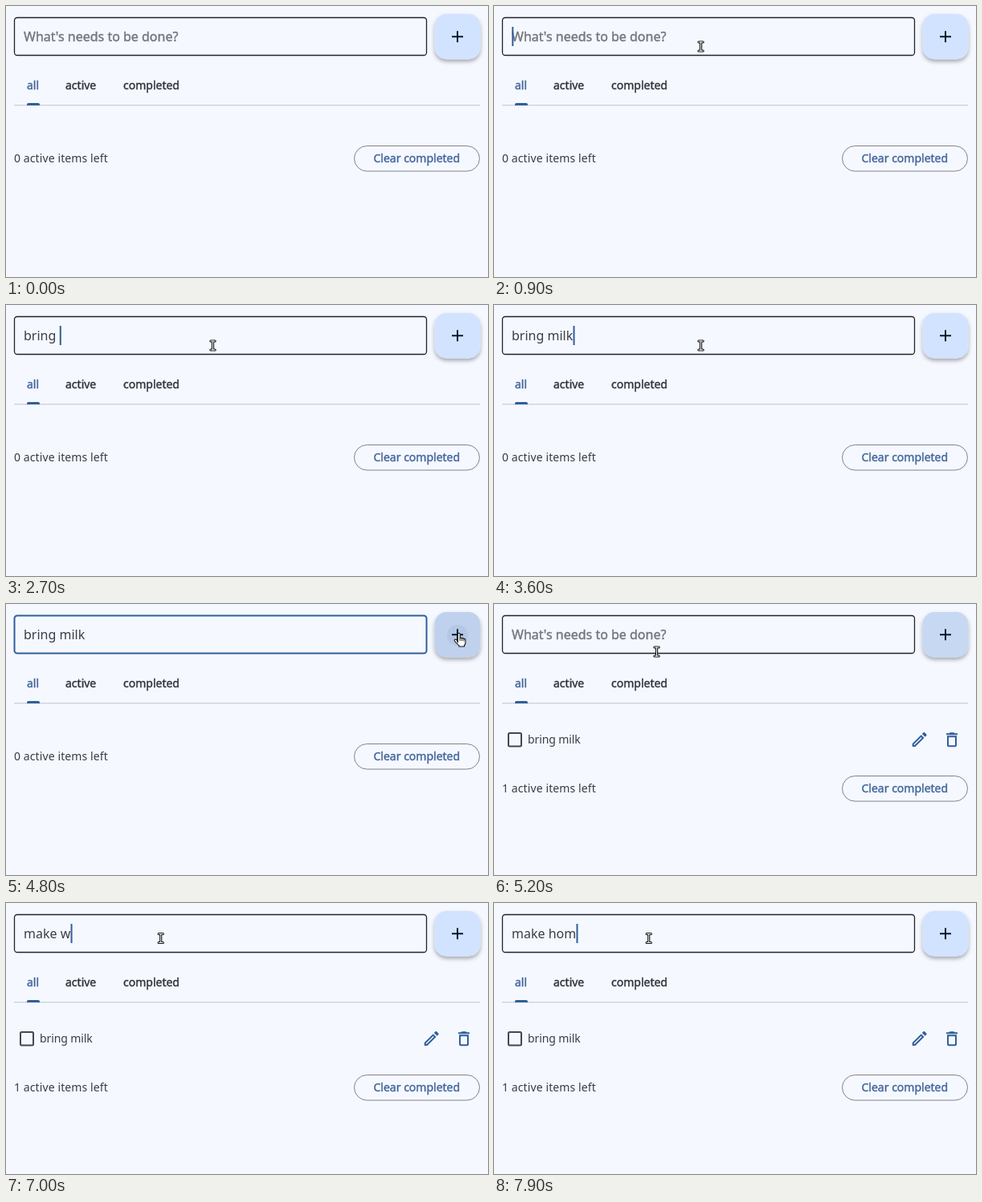
An HTML page that plays this animation: 600 px wide and 338 px high, repeating every 8000 ms.

```html
<!DOCTYPE html>
<html lang="en">
<head>
<meta charset="utf-8">
<title>Todo list</title>
<style>
  html, body { margin: 0; width: 100%; height: 100%; overflow: hidden; background: #f5f8ff; }
  svg { display: block; width: 600px; height: 338px; }
  text { font: 14px "Noto Sans", "Open Sans", sans-serif; fill: #3b3d43; white-space: pre; }
  .medium { stroke: currentColor; stroke-width: .4px; fill: currentColor; }
  .field { font-size: 16px; }
  .blue { color: #42669a; }
  .dark { color: #303238; }
  .hint { color: #74767e; }
  .icon { fill: #305f9b; }
  .cursor { display: none; stroke-linejoin: round; stroke-linecap: round; }
</style>
</head>
<body>
<svg viewBox="0 0 600 338">
  <defs>
    <filter id="shadow" x="-30%" y="-30%" width="160%" height="170%">
      <feDropShadow dx="0" dy="3" stdDeviation="2.4" flood-color="#000" flood-opacity=".32"/>
    </filter>
    <clipPath id="fabClip"><rect x="533.5" y="10" width="57" height="56.5" rx="15"/></clipPath>
  </defs>

  <rect id="box" x="10.5" y="14.5" width="513" height="47" rx="3.5" fill="none"/>
  <text id="hint" class="field medium hint" x="22" y="43.5">What's needs to be done?</text>
  <text id="typed" class="field" x="22" y="43.5"></text>
  <rect id="caret" y="26" width="2" height="24" fill="#305f9b"/>

  <rect id="fab" x="533.5" y="10" width="57" height="56.5" rx="15" filter="url(#shadow)"/>
  <circle id="ripple" cx="562" cy="39" fill="#8fa6cc" clip-path="url(#fabClip)"/>
  <path d="M19 13h-6v6h-2v-6H5v-2h6V5h2v6h6v2z" transform="translate(550 26.2)" fill="#07192f"/>

  <text class="medium blue" x="26" y="104">all</text>
  <text class="medium dark" x="74" y="104">active</text>
  <text class="medium dark" x="146" y="104">completed</text>
  <rect x="10" y="123.3" width="580" height="1" fill="#bcc2cd"/>
  <path d="M26 124v-1q0-2 2-2h12q2 0 2 2v1z" fill="#305f9b"/>

  <g id="item">
    <rect x="18" y="161" width="16" height="16.5" rx="1.5" fill="none" stroke="#44474e" stroke-width="2"/>
    <text x="42" y="174" letter-spacing="-.12">bring milk</text>
    <path class="icon" transform="translate(517.7 157)" d="M14.06 9.02l.92.92L5.92 19H5v-.92l9.06-9.06M17.66 3c-.25 0-.51.1-.7.29l-1.83 1.83 3.75 3.75 1.83-1.83c.39-.39.39-1.02 0-1.41l-2.34-2.34c-.2-.2-.45-.29-.71-.29zm-3.6 3.19L3 17.25V21h3.75L17.81 9.94l-3.75-3.75z"/>
    <path class="icon" transform="translate(558 157.3)" d="M16 9v10H8V9h8m-1.5-6h-5l-1 1H5v2h14V4h-3.5l-1-1zM18 7H6v12c0 1.1.9 2 2 2h8c1.1 0 2-.9 2-2V7z"/>
  </g>

  <g id="footer">
    <text id="count" x="10" y="195" letter-spacing=".1"></text>
    <rect x="433.5" y="174.5" width="156" height="31.5" rx="15.75" fill="none" stroke="#80838b"/>
    <text class="medium blue" x="457.5" y="195">Clear completed</text>
  </g>

  <g id="arrow" class="cursor">
    <path d="M0 0v15l3.5-3.3 2.3 5.3 2.4-1-2.3-5.2h4.9z" fill="#fff" stroke="#111"/>
  </g>
  <g id="beam" class="cursor" fill="none">
    <path d="M-2.6-5.5h5.2M0-5.5v11M-2.6 5.5h5.2" stroke="#111" stroke-width="3.2"/>
    <path d="M-2.6-5.5h5.2M0-5.5v11M-2.6 5.5h5.2" stroke="#fff" stroke-width="1"/>
  </g>
  <g id="hand" class="cursor">
    <path d="M-1.6 5V-5.2q0-1.5 1.4-1.5t1.4 1.5v4.6q1.3-.8 2.4.4 1.4-.7 2.3.6 2-.4 2 1.6v3.4q0 2-1.4 3.2V10h-6.6V8.6Q-3.4 6.2-5.6 3q-.5-1.5.8-1.9 1.3-.2 2 .9z" fill="#fff" stroke="#111" stroke-width="1.1"/>
    <path d="M1.2-.4v3M3.6.1v2.5M5.9.9v2" stroke="#111" fill="none"/>
  </g>
</svg>

<script>
const LOOP = 8000, STEP = 100, ADDED = 4900, PRESS = 4700;
const $ = id => document.getElementById(id);
const set = (id, attrs) => {
  for (const key in attrs) $(id).setAttribute(key, attrs[key]);
};
const show = (id, on) => { $(id).style.display = on ? 'inline' : 'none'; };

const typing = [
  [0, ''], [1900, 'b'], [2000, 'br'], [2300, 'bri'], [2400, 'brin'],
  [2600, 'bring'], [2700, 'bring '], [2900, 'bring m'], [3000, 'bring mi'],
  [3300, 'bring mil'], [3600, 'bring milk'], [ADDED, ''],
  [6400, 'm'], [6500, 'ma'], [6600, 'mak'], [6800, 'make'], [6900, 'make '],
  [7000, 'make w'], [7400, 'make '], [7600, 'make h'], [7800, 'make ho'], [7900, 'make hom']
];
const caret = [[0, 0], [900, 1], [1400, 0], [1900, 1], [4100, 0], [5900, 1]];
const pointer = [
  [0, '', 0, 0], [400, 'arrow', 496, 245], [500, 'arrow', 390, 158],
  [600, 'arrow', 285, 76], [700, 'beam', 257.5, 50.5],
  [4100, 'arrow', 392, 128], [4200, 'arrow', 548, 177],
  [4400, 'arrow', 560, 120], [4500, 'hand', 565, 58], [4600, 'hand', 564, 48],
  [4700, 'hand', 564, 43], [5100, 'beam', 380, 56], [5200, 'beam', 202.5, 59.5],
  [5300, 'beam', 196, 51], [5400, 'beam', 193.5, 46], [5500, 'beam', 192.7, 44]
];
const fabColor = [
  [0, '#d1e3ff'], [4500, '#c6d8f4'], [4700, '#c0d1ed'],
  [5200, '#c7d8f3'], [5300, '#ccdef9'], [5400, '#d1e3ff']
];
const border = [[0, 0], [4400, 1], [5100, 0]];

const at = (steps, t) => steps.findLast(step => step[0] <= t);

const pen = document.createElement('canvas').getContext('2d');
pen.font = getComputedStyle($('typed')).font;

function draw(now) {
  const t = Math.floor((now % LOOP) / STEP) * STEP;
  const text = at(typing, t)[1];
  const blue = at(border, t)[1];
  const added = t >= ADDED;

  $('typed').textContent = text;
  show('hint', !text);
  show('caret', at(caret, t)[1]);
  set('caret', { x: 22.3 + pen.measureText(text).width });
  set('box', { stroke: blue ? '#305f9b' : '#202329', 'stroke-width': blue ? 2 : 1.3 });

  set('fab', { fill: at(fabColor, t)[1] });
  const age = t - PRESS;
  const rippling = age > 0 && age < 500;
  set('ripple', { r: rippling ? 13 + (age - 100) * .13 : 0, opacity: age < 400 ? .25 : .12 });

  show('item', added);
  set('footer', { transform: `translate(0 ${added ? 40 : 0})` });
  $('count').textContent = `${added ? 1 : 0} active items left`;

  const [, kind, x, y] = at(pointer, t);
  for (const id of ['arrow', 'beam', 'hand']) show(id, id === kind);
  if (kind) set(kind, { transform: `translate(${x} ${y})` });
}

const start = performance.now();
function tick() {
  draw(performance.now() - start);
  requestAnimationFrame(tick);
}
tick();
</script>
</body>
</html>
```
